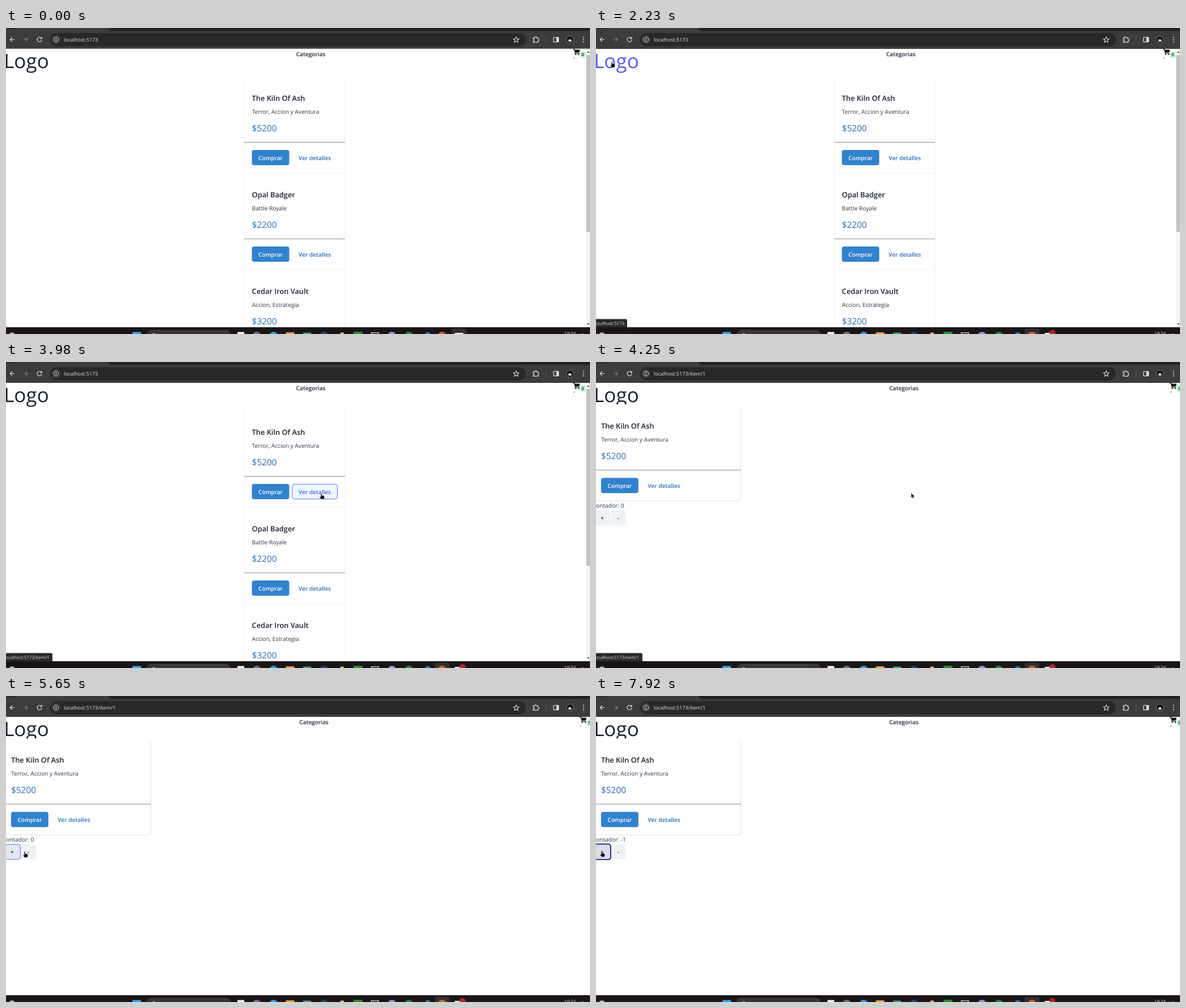
Recreate the animation shown at these times as an HTML page. Size 1032 by 542 pixels, loop 8000 ms.

```html
<!DOCTYPE html>
<html lang="es">
<head>
<meta charset="utf-8">
<title>Tienda</title>
<style>
html, body { margin: 0; width: 100%; height: 100%; overflow: hidden; background: #fefefe; }
svg { display: block; width: 1032px; height: 542px; font-family: "Open Sans", "Noto Sans", sans-serif; text-rendering: geometricPrecision; }

.semi { font-weight: 600; font-size: 10.1px; }
.body { font-size: 10.2px; fill: #2d3748; }
.title { font-weight: 600; font-size: 12.8px; fill: #1a202c; }
.price { font-size: 15.4px; fill: #2b6cb0; }
.mid { text-anchor: middle; }
.end { text-anchor: end; }
.line { fill: none; stroke: #e3e3e3; stroke-width: 1.2; }

/* Everything shares one 8 s clock; step-end keeps hard changes hard. */
.t { animation: 8s step-end infinite; }
.ease { animation-timing-function: ease-in-out; }
.lin { animation-timing-function: linear; }

#home { animation-name: home; }
#item { animation-name: item; }
.urlPath { animation-name: item; }
#nav { animation-name: nav; }
#cart { animation-name: cart; }
#logo { animation-name: logo; }
#edge { animation-name: edge; }
#alert { animation-name: alert; }
#tileA { animation-name: tileA; }
#tileB { animation-name: tileB; }
#statusHome { animation-name: statusHome; }
#statusItem { animation-name: statusItem; }
#verHover { animation-name: verHover; }
#verText { animation-name: verText; }
#plus { animation-name: plus; }
#minus { animation-name: minus; }
#plusRing { animation-name: plusRing; }
#minusRing { animation-name: minusRing; }
#n0 { animation-name: n0; }
#n1 { animation-name: n1; }
#n2 { animation-name: n2; }
#n3 { animation-name: n3; }
#cursor { animation-name: path; }
#arrow { animation-name: arrow; }
#hand { animation-name: hand; }

@keyframes home { 0% { opacity: 1 } 51.38% { opacity: 0 } }
@keyframes item { 0% { opacity: 0 } 51.38% { opacity: 1 } }
@keyframes nav { 0% { transform: none } 51.38% { transform: translate(5.5px, 0) } }
@keyframes cart { 0% { transform: none } 51.38% { transform: translate(11.7px, 0) } }
@keyframes logo { 0% { fill: #1a202c } 17.7% { fill: #535bf2 } 37.7% { fill: #1a202c } }
@keyframes edge { 0% { opacity: 1 } 26.9% { opacity: 0 } }
@keyframes alert { 0%, .8% { transform: scale(0) } 5%, 100% { transform: scale(1) } }
@keyframes tileA { 0% { opacity: 1 } 26.9% { opacity: 0 } }
@keyframes tileB { 0% { opacity: 0 } 26.9% { opacity: 1 } }
@keyframes statusHome { 0% { opacity: 0 } 19.4% { opacity: 1 } 41.5% { opacity: 0 } }
@keyframes statusItem { 0% { opacity: 0 } 47.4% { opacity: 1 } 58.8% { opacity: 0 } }
@keyframes verHover { 0%, 43.5% { opacity: 0 } 46%, 100% { opacity: 1 } }
@keyframes verText { 0%, 43.5% { fill: #2b6cb0 } 46%, 100% { fill: #535bf2 } }
@keyframes plus {
  0%, 67.4% { fill: #edf2f7; stroke: #646cff00 }
  69%, 70.7% { fill: #e2e8f0; stroke: #646cff }
  73%, 91% { fill: #edf2f7; stroke: #646cff00 }
  92.5%, 93.4% { fill: #e2e8f0; stroke: #646cff }
  94.7%, 100% { fill: #d8dcec; stroke: #646cff }
}
@keyframes minus {
  0%, 70.7% { fill: #edf2f7; stroke: #646cff00 }
  72.5%, 89.8% { fill: #dfe4ee; stroke: #646cff }
  91.5%, 100% { fill: #edf2f7; stroke: #646cff00 }
}
@keyframes plusRing { 0% { opacity: 0 } 93.8% { opacity: 1 } }
@keyframes minusRing { 0% { opacity: 0 } 73% { opacity: 1 } 93.8% { opacity: 0 } }
@keyframes n0 { 0% { opacity: 1 } 74.6% { opacity: 0 } }
@keyframes n1 { 0% { opacity: 0 } 74.6% { opacity: 1 } 80.4% { opacity: 0 } 99% { opacity: 1 } }
@keyframes n2 { 0% { opacity: 0 } 80.4% { opacity: 1 } 85.8% { opacity: 0 } 94.7% { opacity: 1 } 99% { opacity: 0 } }
@keyframes n3 { 0% { opacity: 0 } 85.8% { opacity: 1 } 94.7% { opacity: 0 } }
@keyframes arrow { 0% { opacity: 0 } 9.1% { opacity: 1 } 17.7% { opacity: 0 } 37.7% { opacity: 1 } 43.5% { opacity: 0 } 51.38% { opacity: 1 } 67.4% { opacity: 0 } }
@keyframes hand { 0% { opacity: 0 } 17.7% { opacity: 1 } 37.7% { opacity: 0 } 43.5% { opacity: 1 } 51.38% { opacity: 0 } 67.4% { opacity: 1 } }
@keyframes path {
  0%, 9.1% { transform: translate(905px, 393px) }
  13.5%, 14.2% { transform: translate(197px, 112px) }
  18.5%, 19.3% { transform: translate(36px, 54px) }
  21.7%, 36.7% { transform: translate(28px, 59px) }
  44% { transform: translate(588px, 235px) }
  46.5%, 47.4% { transform: translate(566px, 234px) }
  49.7%, 57.1% { transform: translate(557px, 232px) }
  60.6%, 63.8% { transform: translate(225px, 209px) }
  68.6% { transform: translate(13px, 286px) }
  70.6% { transform: translate(33px, 275px) }
  73.9%, 79.5% { transform: translate(39px, 273px) }
  88.8%, 89.6% { transform: translate(35px, 275px) }
  93.5%, 97.2% { transform: translate(9px, 273px) }
  97.3%, 100% { transform: translate(10px, 274px) }
}
</style>
</head>
<body>
<svg viewBox="0 0 1032 542">
  <rect width="1032" height="542" fill="#fefefe"/>

  <!-- page header -->
  <text id="logo" class="t end" x="75.8" y="70.5" font-size="35">Logo</text>
  <text id="nav" class="t semi mid" x="538.6" y="49.8" fill="#1a202c">Categorias</text>
  <g id="cart" class="t">
    <path d="M1002 37.6h2.4l1.6 7.4h7.2" fill="none" stroke="#111" stroke-width="1.2"/>
    <path d="M1004.6 38.5h9.6l-1.3 5h-7.2z" fill="#111"/>
    <circle cx="1006.6" cy="46.6" r="1.2"/><circle cx="1012.2" cy="46.6" r="1.2"/>
    <rect x="1003.3" y="52.4" width="1" height="2" fill="#333"/>
    <rect x="1014.5" y="41" width="10" height="12" rx="1.5" fill="#c6f6d5"/>
    <text class="mid" x="1019.4" y="50" font-size="8" font-weight="700" fill="#22543d">0</text>
  </g>

  <!-- product list -->
  <g id="home" class="t">
    <rect x="0" y="82" width="1024" height="448" fill="#fefefe"/>
    <g id="cards"></g>
    <rect x="1025" y="37" width="7" height="493" fill="#f4f4f4"/>
    <rect x="1025.6" y="48" width="6.4" height="313" fill="#c1c1c1"/>
    <path d="M1026.8 44l2.4-3 2.4 3zM1026.8 523l2.4 3 2.4-3z" fill="#555"/>
  </g>

  <!-- product detail -->
  <g id="item" class="t">
    <rect y="75" width="1032" height="455" fill="#fefefe"/>
    <path class="line" d="M255.8 81V243q0 3-3 3H0"/>
    <path d="M0 191.5H256" stroke="#8b8b8b"/>
    <g id="detail" transform="translate(-425.6 -10.8)"></g>
    <text class="body end" x="41" y="258.2">contador:</text>
    <g class="body">
      <text id="n0" class="t" x="43.8" y="258.2">0</text>
      <text id="n1" class="t" x="43.8" y="258.2">-1</text>
      <text id="n2" class="t" x="43.8" y="258.2">-2</text>
      <text id="n3" class="t" x="43.8" y="258.2">-3</text>
    </g>
    <rect id="plus" class="t lin" x="-3.5" y="262.8" width="29" height="26.4" rx="4"/>
    <rect id="minus" class="t lin" x="26.4" y="262.8" width="26.4" height="26.4" rx="4"/>
    <rect id="plusRing" class="t" x="-4" y="262.2" width="30" height="27.6" rx="4" fill="none" stroke="#15154a" stroke-width="1.6"/>
    <rect id="minusRing" class="t" x="26" y="262.2" width="27.2" height="27.6" rx="4" fill="none" stroke="#15154a" stroke-width="1.6"/>
    <text class="semi mid" x="10.9" y="279.6" fill="#1a202c">+</text>
    <text class="semi mid" x="39.6" y="279.6" fill="#1a202c">-</text>
  </g>

  <!-- link preview -->
  <g font-size="7.8" fill="#dcdcdc">
    <g id="statusHome" class="t">
      <path d="M0 515.5H52q3 0 3 3V530H0z" fill="#2a2a2a"/>
      <text class="end" x="50" y="525.6">localhost:5173</text>
    </g>
    <g id="statusItem" class="t">
      <path d="M0 515.5H79q3 0 3 3V530H0z" fill="#2a2a2a"/>
      <text class="end" x="76.5" y="525.6">localhost:5173/item/1</text>
    </g>
  </g>

  <!-- browser bar -->
  <rect width="1032" height="37" fill="#3c3c3c"/>
  <path d="M181 0H1032V5H187q-5 0-6-5z" fill="#202121"/>
  <path d="M0 0h20q-1 2-4 2H0z" fill="#2a2a2a"/>
  <rect id="edge" class="t" y="36" width="1032" height="1.2" fill="#858585"/>
  <rect x="77.5" y="9" width="841" height="23.5" rx="11.7" fill="#282828"/>
  <circle cx="88.5" cy="20.5" r="8" fill="#3a3a3a"/>
  <g fill="none" stroke="#e0e0e0" stroke-width="1.2">
    <path d="M15 20.5H7.5m3.6-3.8L7.3 20.5l3.8 3.8"/>
    <path d="M30.500 20.500H38m-3.600-3.800L38.200 20.500l-3.800 3.800" stroke="#7c7c7c"/>
    <path d="M62.500 18.200A4 4 0 1 0 63.200 21M63.200 16v3h-3"/>
    <circle cx="88.5" cy="20.500" r="4.300" stroke-width="1"/>
    <path d="M88.500 20v2.800M88.500 18v1.100"/>
    <path d="M901.700 15.800l1.400 3.300 3.500.3-2.700 2.300.8 3.500-3-1.900-3 1.900.8-3.500-2.700-2.300 3.500-.3z" stroke-width="1.100"/>
    <path d="M931.800 17.300h2.700q0-2 1.500-2t1.500 2h2.700v2.700q1.700 0 1.700 1.400t-1.700 1.400v2.400h-8.400v-2.500q1.800-.2 1.800-1.500t-1.800-1.500z"/>
    <rect x="967.500" y="16.500" width="9" height="8.200" rx="1"/>
  </g>
  <rect x="972.500" y="16.500" width="4" height="8" fill="#e0e0e0"/>
  <rect x="953.600" y="15" width="1" height="11" fill="#606060"/>
  <circle cx="996.500" cy="20.500" r="6.200" fill="#151515" stroke="#8b8b8b" stroke-width=".8"/>
  <path d="M993.800 24v-1.400a2.700 2.700 0 0 1 5.400 0V24z" fill="#e8e8e8"/>
  <g fill="#e0e0e0"><circle cx="1020.500" cy="16.500" r="1.100"/><circle cx="1020.500" cy="20.500" r="1.100"/><circle cx="1020.500" cy="24.500" r="1.100"/></g>
  <text x="102" y="24" font-size="9" fill="#e6e6e6">localhost:5173<tspan class="t urlPath" id="slug"></tspan></text>

  <!-- taskbar -->
  <rect y="530" width="1032" height="12" fill="#1b1516"/>
  <rect id="tileA" class="t" x="787.500" y="532.500" width="26" height="12" rx="3" fill="#342e2f"/>
  <rect id="tileB" class="t" x="757.500" y="532.500" width="26" height="12" rx="3" fill="#342e2f"/>
  <rect x="249" y="535.500" width="147.500" height="16" rx="8" fill="#383334" stroke="#565051" stroke-width=".8"/>
  <circle cx="261" cy="544" r="3" fill="none" stroke="#ccc"/>
  <circle cx="10.500" cy="545" r="6" fill="#aaa"/>
  <g id="icons"></g>
  <g transform="translate(806.500 540.500)"><circle id="alert" class="t lin" r="5.500" fill="#b3252b"/></g>
  <text class="mid" x="996.800" y="543.600" font-size="8" fill="#f2f2f2">19:34</text>
  <path d="M1015.500 543q3.500-3 7 0" fill="none" stroke="#ccc"/>

  <!-- pointer -->
  <g id="cursor" class="t ease">
    <path id="arrow" class="t" d="M0 0V8.600L2 6.900 3.400 9.900 4.900 9.200 3.500 6.300H6z" fill="#000" stroke="#fff" stroke-width=".5"/>
    <path id="hand" class="t" d="M-.800.800Q0-.600.900.800V4.300Q2 3.600 2.700 4.600 3.700 4 4.300 5 5.600 4.600 5.600 6V8.400L4.700 11H-.200L-2.700 7.500Q-3.300 6.100-2.100 6.200L-.800 7.200z" fill="#000" stroke="#fff" stroke-width=".5"/>
  </g>
</svg>
<script>
const $ = id => document.getElementById(id);

// Text and buttons of a product, placed for the first row of the list.
const content = ([title, genre, price], hover) => `
  <text class="title" x="434.600" y="128.600">${title}</text>
  <text class="body" x="434.600" y="152">${genre}</text>
  <text class="price" x="434.600" y="182.600">$${price}</text>
  <rect x="434.500" y="216" width="66" height="27" rx="4" fill="#3182ce"/>
  <text class="semi mid" x="467.500" y="233.800" fill="#fff">Comprar</text>
  ${hover ? '<rect id="verHover" class="t lin" x="506" y="216.300" width="79.500" height="26.400" rx="4" fill="#ebf8ff" stroke="#646cff"/>' : ''}
  <text ${hover ? 'id="verText"' : ''} class="t lin semi mid" x="545.700" y="233.800" fill="#2b6cb0">Ver detalles</text>`;

const games = [
  ['The Kiln Of Ash', 'Terror, Accion y Aventura', 5200],
  ['Opal Badger', 'Battle Royale', 2200],
  ['Cedar Iron Vault', 'Accion, Estrategia', 3200]
];
$('cards').innerHTML = games.map((game, i) => `
  <g transform="translate(0 ${i * 171})">
    <path d="M421 86V254q0 3 3 3H596q3 0 3-3V86" fill="none" stroke="#f0f0f0"/>
    <path d="M421 202.500H599" stroke="#8b8b8b"/>
    ${content(game, i === 0)}
  </g>`).join('');
$('detail').innerHTML = content(games[0]);

// SVG spans ignore opacity, so the path is its own text after the host.
const host = $('slug').parentNode;
$('slug').remove();
const slug = host.cloneNode();
slug.textContent = '/item/1';
slug.setAttribute('class', 't urlPath');
slug.setAttribute('x', 102 + host.getComputedTextLength());
host.after(slug);

const square = (x, y, w, fill) => `<rect x="${x - w / 2}" y="${y}" width="${w}" height="14" fill="${fill}"/>`;
const disc = (x, fill) => `<circle cx="${x}" cy="545.500" r="7.500" fill="${fill}"/>`;
$('icons').innerHTML =
  square(231, 538.5, 15, '#35a5e5') + square(415, 538.5, 12, '#f3f3f3') + disc(443, '#737584') +
  disc(473, '#2d9fd8') + square(502, 539, 15, '#e2a03c') + square(532, 539.5, 14, '#4a9c9b') +
  disc(562, '#24436f') + square(594, 539.5, 6, '#e6c05a') + square(622, 538, 16, '#278a35') +
  square(652, 539, 14, '#c8c8c8') + square(652, 540.5, 11, '#111') + disc(682, '#8b90cf') +
  disc(712, '#23884a') + square(745, 539, 8, '#2479bd') + disc(770.5, '#c9672a') + square(800.5, 540, 15, '#f1f1f1');
</script>
</body>
</html>
```
